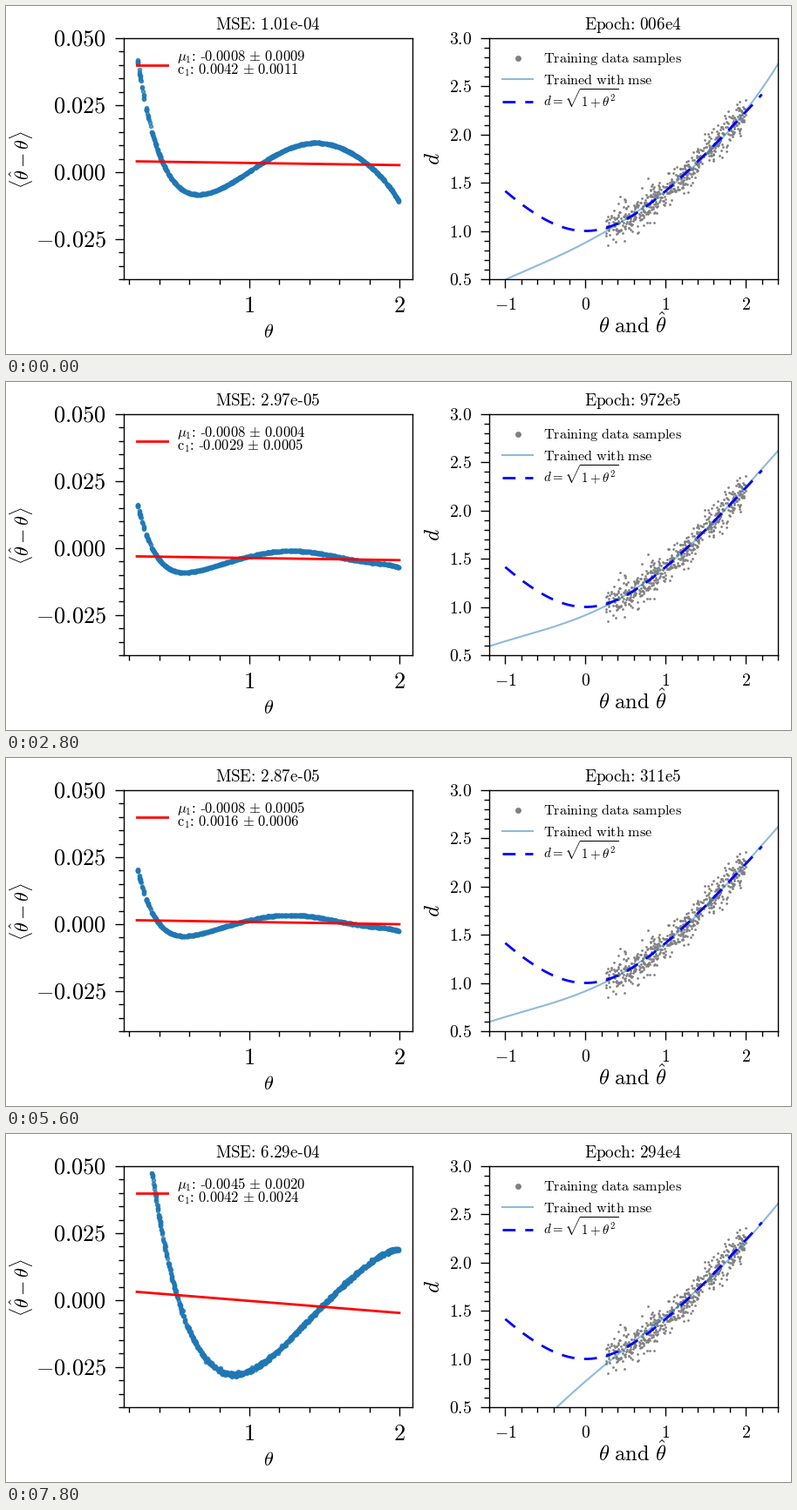
These frames come from a looping animation (900x400 px, 8000 ms). A matplotlib script:

```python
import numpy as np
import matplotlib.pyplot as plt
from matplotlib.animation import FuncAnimation
from matplotlib.ticker import AutoMinorLocator, FuncFormatter, MultipleLocator
from numpy.polynomial.legendre import legval

W, H = 900, 400
FRAMES, INTERVAL = 40, 200
LOW, HIGH = 0.25, 2.0  # sampled range of theta

plt.rcParams.update({"mathtext.fontset": "cm", "font.family": "Liberation Serif"})

# Training snapshots: frame, epoch, mse, slope and offset of the linear fit
SNAPSHOTS = [
    (0, 6e4, 1.01e-4, -8e-4, 42e-4),
    (6, 193e4, 3.19e-4, -20e-4, 12e-4),
    (14, 972e5, 2.97e-5, -8e-4, -29e-4),
    (20, 432e4, 2.43e-4, -27e-4, 45e-4),
    (24, 107e4, 2.11e-4, -12e-4, 33e-4),
    (32, 904e6, 3.90e-6, -5e-4, -1e-5),
    (39, 294e4, 6.29e-4, -45e-4, 42e-4),
]
KEYS, EPOCH, MSE, MU, C = np.array(SNAPSHOTS).T

rng = np.random.default_rng(4)
theta = np.sort(rng.uniform(LOW, HIGH, 900))
jitter = rng.normal(0, 1, theta.size)
sample_x = rng.uniform(LOW, HIGH, 550)
sample_d = np.sqrt(1 + sample_x**2) + rng.normal(0, 0.085, sample_x.size)
grid = np.linspace(-1.2, 2.4, 200)


def state(frame):
    """Epoch, mse, slope and offset, the first two on a log scale."""
    def log_at(values):
        return np.exp(np.interp(frame, KEYS, np.log(values)))
    return (log_at(EPOCH), log_at(MSE),
            np.interp(frame, KEYS, MU), np.interp(frame, KEYS, C))


def bias(t, rms, mu, c):
    """Linear fit plus Legendre terms that grow with the rms error."""
    terms = np.array([
        0, 0,
        50 / (1 + np.exp((16.8 - rms) / 2.4)),
        -31 * (1 - np.exp(-(rms / 9) ** 2.5)),
        9 * np.tanh(rms / 5),
        -3 * np.tanh(rms / 1.5),
        1.2, -0.9,
    ])
    mid, half = (LOW + HIGH) / 2, (HIGH - LOW) / 2
    return mu * t + c + legval((t - mid) / half, terms) / 1000


def trained_curve(rms, mu, c):
    """Truth shifted by the bias, with error-driven tails outside the samples."""
    inner = np.arange(0.5, 2.1, 0.5)
    root = np.sqrt(1 + inner**2)
    d_inner = root - bias(inner, rms, mu, c) * inner / root
    upturn = 0.22 * np.exp(-((rms - 13.5) / 4.5) ** 2)
    xs = [-1.2, -0.6, 0, *inner, 2.4]
    ds = [0.80 - 0.038 * rms, 0.86 - 0.022 * rms, 0.962 - 0.0078 * rms,
          *d_inner, 2.61 + upturn]
    return np.polyval(np.polyfit(xs, ds, 5), grid)


def slope_error(mse, mu, c):
    mean = c + mu * (LOW + HIGH) / 2
    spread = np.sqrt(max(mse - mean**2, 1e-6))
    return 0.185e-4 * (spread * 1e4) ** 0.85


def rm(text):
    """Upright Computer Modern text with true hyphens."""
    parts = []
    for part in text.split("-"):
        words = [rf"\text{{{w}}}" if w else "" for w in part.split(" ")]
        parts.append("$" + r"\ ".join(words) + "$" if part else "")
    return "-".join(parts)


def fit_text(symbol, value, err):
    value, err = rm(f"{value:.4f}"), rm(f"{err:.4f}")
    return rf"${symbol}\text{{:}}\ $" + value + r"$\ {\pm}\ $" + err


def epoch_text(value):
    power = max(4, int(np.floor(np.log10(value) + 1e-9)) - 2)
    return rm(f"Epoch: {round(value / 10**power):03d}e{power}")


fig = plt.figure(figsize=(W / 100, H / 100), dpi=100, facecolor="white")


def panel(x, xlim, ylim, ystep, digits, size, ypad):
    ax = fig.add_axes([x / W, 1 - 314 / H, 331 / W, 277 / H])
    ax.set(xlim=xlim, ylim=ylim)
    for axis, step, places in ((ax.xaxis, 1, 0), (ax.yaxis, ystep, digits)):
        axis.set_major_locator(MultipleLocator(step))
        axis.set_minor_locator(AutoMinorLocator(5))
        axis.set_major_formatter(
            FuncFormatter(lambda v, _, p=places: f"${v:.{p}f}$"))
    ax.tick_params(which="major", length=7, width=1, labelsize=size)
    ax.tick_params(which="minor", length=4, width=1)
    ax.tick_params(axis="x", pad=7.8)
    ax.tick_params(axis="y", pad=ypad)
    for spine in ax.spines.values():
        spine.set_linewidth(1)
    return ax


def label(x, y, text, size, **kw):
    kw = {"va": "baseline", **kw}
    return fig.text(x / W, 1 - y / H, text, fontsize=size, **kw)


def key_line(x, y, **kw):
    fig.add_artist(plt.Line2D([x / W, (x + 35) / W], [1 - y / H] * 2, **kw))


left = panel(135, (0.1625, 2.0875), (-0.04, 0.05), 0.025, 3, 19, 7.5)
right = panel(554, (-1.2, 2.4), (0.5, 3), 0.5, 1, 14.1, 7)

bias_dots, = left.plot([], [], "o", ms=3, color="tab:blue", alpha=0.7)
fit_line, = left.plot([], [], color="red", lw=2)

dash = dict(color="blue", lw=2, ls=(0, (5.3, 4)), dash_capstyle="butt")
soft = dict(color="tab:blue", lw=1.5, alpha=0.5)
truth = np.linspace(-1, 2.2, 200)
right.plot(sample_x, sample_d, "o", ms=2, mew=0, color="gray")
net_line, = right.plot([], [], **soft)
right.plot(truth, np.sqrt(1 + truth**2), **dash)

mse_title = label(300.5, 27, "", 13.7, ha="center")
epoch_title = label(719, 27, "", 13.8, ha="center")

key_line(150, 68, color="red", lw=2)
mu_label = label(196.5, 63, "", 11.9)
c_label = label(196.5, 78.5, "", 11.9)

fig.add_artist(plt.Line2D([586.5 / W], [1 - 59.5 / H], marker="o",
                          ms=5, mew=0, color="gray"))
key_line(569, 84, **soft)
key_line(569, 110, **dash)
label(616, 64.5, rm("Training data samples"), 11.7)
label(616, 89.5, rm("Trained with mse"), 11.7)
label(616, 116, r"$d=\sqrt{1+\theta^2}$", 10.8)

label(301, 381, r"$\theta$", 16, ha="center")
label(718, 376.5, r"$\theta\ \mathrm{and}\ \hat{\theta}$", 17.6, ha="center")
label(18, 177, r"$\langle\hat{\theta}-\theta\rangle$", 16,
      rotation=90, ha="center", va="center")
label(491, 176, "$d$", 18, rotation=90, ha="center", va="center")


def update(frame):
    epoch, mse, mu, c = state(frame)
    rms, err = 1000 * np.sqrt(mse), slope_error(mse, mu, c)
    ends = np.array([LOW, HIGH])

    bias_dots.set_data(theta, bias(theta, rms, mu, c) + 900 * mse**2 * jitter)
    fit_line.set_data(ends, mu * ends + c)
    net_line.set_data(grid, trained_curve(rms, mu, c))

    mse_title.set_text(rm(f"MSE: {mse:.2e}"))
    epoch_title.set_text(epoch_text(epoch))
    mu_label.set_text(fit_text(r"\mu_1", mu, err))
    c_label.set_text(fit_text(r"\mathrm{c}_1", c, 1.2 * err))
    return bias_dots, fit_line, net_line


anim = FuncAnimation(fig, update, frames=FRAMES, interval=INTERVAL,
                     repeat=True, repeat_delay=0, blit=False)
plt.show()
```
